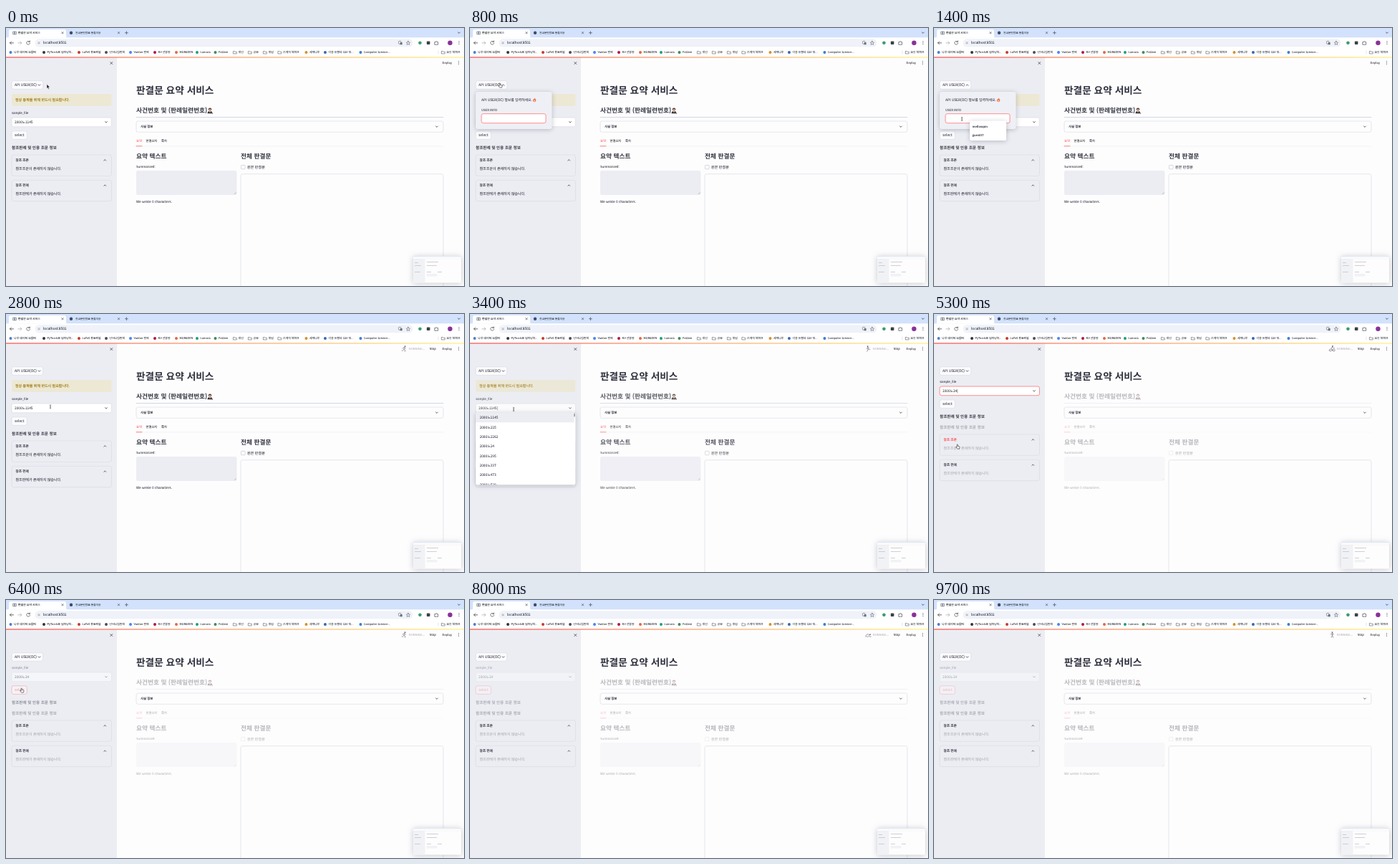
Recreate the animation shown at these times as an HTML page. Size 640 by 360 pixels, loop 9800 ms.

```html
<!DOCTYPE html>
<html lang="ko">
<head>
<meta charset="utf-8">
<title>판결문 요약 서비스</title>
<style>
  html, body { margin: 0; width: 100%; height: 100%; overflow: hidden; background: #fff; }
  svg { display: block; width: 100vw; height: 100vh; }
  text {
    font-family: "Noto Sans CJK KR", "Noto Sans CJK JP", "Noto Sans", sans-serif;
    white-space: pre; text-rendering: geometricPrecision;
  }
  .shadow { filter: drop-shadow(0 1px 3px rgba(40, 45, 70, .28)); }
  .soft { filter: drop-shadow(0 1px 4px rgba(40, 45, 60, .25)); }
</style>
</head>
<body>
<svg id="stage" viewBox="0 0 640 360"></svg>
<script>
const LOOP = 9800, STEP = 100;
const INK = '#31333f', RED = '#ff4b4b', PANEL = '#ecedf3', EDGE = '#d6d8df';

// Text is placed by its left edge and vertical middle; medium weight gets a hairline stroke.
const text = (x, y, size, str, fill = INK, weight = 400, id = '') =>
  `<text ${id && `id="${id}"`} x="${x}" y="${(y + size * .34).toFixed(2)}" font-size="${size}" font-weight="${weight}" fill="${fill}"` +
  ` stroke="${fill}" stroke-width="${weight === 500 ? .14 : weight === 400 ? .06 : 0}">${str}</text>`;
const box = (x, y, w, h, fill, stroke = 'none', r = 2.5, extra = '') =>
  `<rect x="${x}" y="${y}" width="${w}" height="${h}" rx="${r}" fill="${fill}" stroke="${stroke}" stroke-width=".6" ${extra}/>`;
const dot = (x, y, r, fill) => `<circle cx="${x}" cy="${y}" r="${r}" fill="${fill}"/>`;
const line = (d, stroke = INK, w = .7, extra = '') =>
  `<path d="${d}" fill="none" stroke="${stroke}" stroke-width="${w}" stroke-linecap="round" stroke-linejoin="round" ${extra}/>`;
const group = (id, body, extra = '') => `<g id="${id}" ${extra}>${body}</g>`;
const cross = (x, y, r, w) => line(`M${x - r} ${y - r}l${2 * r} ${2 * r}m0 ${-2 * r}l${-2 * r} ${2 * r}`, INK, w);
const chevron = (x, y, up = false, id = '') =>
  line(`M${x - 1.4} ${y + (up ? .7 : -.7)}l1.4 ${up ? -1.4 : 1.4}l1.4 ${up ? 1.4 : -1.4}`, INK, .8, id && `id="${id}"`);
const folder = (x, y) => line(`M${x - 2.2} ${y - 1.6}h1.6l.7.8h2.2v2.7h-4.5z`, '#555963', .6);

function browser() {
  const marks = [
    [6.5, '나루 데이터 모음터', '#4c7fd0'], [53, 'PyTorch로 딥러닝하...', '#333'],
    [102, 'LaTeX 튜토리얼', '#c9372c'], [140, '단어나침반북', '#4a4d55'],
    [174, 'Vanton 번역', '#4285f4'], [208, 'NV 선봉원', '#b5133f'],
    [238, 'MORADEN', '#e8663c'], [267, 'Lumora', '#16a081'], [292.5, 'Fotzeni', '#3c8c5a'],
    [320, '개인'], [341, '공부'], [362, '게임'], [382.5, '기계적 북마크'],
    [419.5, '새벽나루', '#d98f2b'], [446, '각종 유형의 CSV 파...', '#3567b5'],
    [495.5, 'Computer Science...', '#3b7dd8'], [611, '모든 북마크']
  ];
  return box(0, 0, 640, 13.5, '#d3e2fc', 'none', 0) +
    '<path d="M2 13.5q2 0 2-2V4.5q0-2.5 2.5-2.5h75q2.500 0 2.500 2.500v7q0 2 2 2z" fill="#fff"/>' +
    line('M10 5.200h2.200v3.400h-2.200zM12.200 5.200h2.200v3.400h-2.200z', '#4a5263', .6) +
    text(17, 6.7, 3.9, '판결문 요약 서비스', '#1f2329') + cross(79, 6.7, 1.2, .6) +
    dot(91, 6.7, 2.2, '#3e4a66') + text(97, 6.7, 3.75, '전국문헌정보 통합이용', '#333946') +
    cross(157.5, 6.7, 1.2, .6) + line('M166.400 6.700h4M168.400 4.700v4', INK, .6) + chevron(633, 6.7) +
    box(0, 13.5, 640, 27, '#fff', 'none', 0) +
    line('M10.500 20.800h-5m2-2l-2 2l2 2') + line('M16.800 20.800h5m-2-2l2 2l-2 2', '#a5a8af') +
    line('M33 19.200a2.400 2.400 0 1 0 .5 2M33.300 17.800v1.700h-1.700', '#444852') +
    box(40.5, 15.3, 528, 11, '#eff2f9', 'none', 5.5) + dot(46, 20.8, 2.9, '#fff') +
    line('M44.500 19.900h3m-3 1.900h3', '#444852', .5) + text(52, 20.8, 4.8, 'localhost:8501', '#24272d') +
    box(548.7, 18.4, 3.3, 3.8, '#fff', '#555963', .5) + box(550.7, 20, 3, 3.3, '#6b7078', 'none', .5) +
    line('M562 18.200l.8 1.800 1.900.2-1.400 1.300.4 1.900-1.700-1-1.700 1 .4-1.900-1.400-1.300 1.900-.2z', '#444852', .5) +
    dot(578.5, 20.8, 2.3, '#3a9a6c') + box(587.9, 18.5, 4.6, 4.6, '#3c4047', 'none', 1) +
    line('M599.300 19.500h1.400a.8.8 0 0 1 1.600 0h1.400v3.700h-4.400z', '#444852', .7) +
    dot(620.5, 20.8, 3.2, '#8a2f9a') +
    [18.9, 20.8, 22.7].map(y => dot(633, y, .55, '#444852')).join('') +
    marks.map(([x, name, color]) => (color ? dot(x, 34, 2, color) : folder(x, 34)) +
      text(x + 4.6, 34, 3.9, name, '#2c3038')).join('') +
    line('M604 32v4', '#c7cad2', .5);
}

function judge(x, y) {
  return dot(x, y - 1.7, 2.2, '#3a2a25') + dot(x, y - 1, 1.6, '#e5a98c') +
    `<path d="M${x - 3.500} ${y + 4}q0-3.300 3.500-3.300t3.500 3.300z" fill="#35313a"/>` +
    `<path d="M${x - .9} ${y + .8}h1.800l-.9 2.200z" fill="#fff"/>` +
    line(`M${x + 2} ${y + 3}l1.500 1.200`, '#8b5a35', 1);
}

function mainPage() {
  return text(182, 87.6, 13.7, '판결문 요약 서비스', INK, 700) +
    group('stale', text(182, 115.3, 8.7, '사건번호 및 (판례일련번호)', INK, 600) + judge(285, 115.3) +
      line('M182 124.500H611', '#c0c7dc', .7) +
      text(182, 157.7, 4.3, '요약', RED) + text(195.5, 157.7, 4.3, '판결요지') + text(217, 157.7, 4.3, '목차') +
      line('M182 164.900H611', '#e6e7ec', .5) + line('M182 164.800h8', RED, .7) +
      text(182, 179, 8.7, '요약 텍스트', INK, 600) + text(328, 179, 8.7, '전체 판결문', INK, 600) +
      text(182, 194, 4.3, 'Summarized:') + box(182, 199, 140.5, 34, PANEL) +
      line('M319.300 231.500l2-2m-.8 2l.8-.8', '#8d9099', .4) +
      text(182, 242.3, 4.7, 'We wrote 0 characters.') +
      box(328.6, 191.4, 5.4, 5.4, '#fff', '#b9bcc5', .7) + text(337, 194, 5.1, '원본 판결문')) +
    box(182, 130, 429, 15.3, 'none', EDGE) +
    text(188, 137.7, 4.4, '사실 정보', INK, 500) + chevron(602, 137.7) +
    box(328, 203.7, 283, 170, 'none', EDGE);
}

function expander(y, title, body, id) {
  return box(8, y, 139.5, 29.3, 'none', EDGE) + text(13.5, y + 7.4, 4.6, title, INK, 500, id) +
    chevron(138.300, y + 7.300, true) +
    text(13.5, y + 19.4, 5, body).replace('<text', '<text class="note"');
}

function sidebar() {
  const heading = '참조판례 및 인용 조문 정보';
  return box(0, 41, 155, 319, PANEL, 'none', 0) + cross(147.3, 49, 1.5, .7) +
    box(8, 73.7, 43.7, 11.6, '#fbfbfd', EDGE) + text(12, 79.5, 4.85, 'API USER(OC)') +
    chevron(46.5, 79.6, false, 'userDown') + chevron(46.5, 79.6, true, 'userUp') +
    group('warning', box(8, 92, 139.5, 16.7, '#ece8d3') + text(13, 100.2, 5, '정상 동작을 위해 반드시 필요합니다.', '#a17c17', 500)) +
    group('form', text(8, 119, 4.3, 'sample_file') +
      box(8, 125, 139.5, 12.7, '#fff', EDGE, 2.5, 'id="field"') + text(12, 131.3, 4.75, '', INK, 400, 'picked') +
      chevron(140, 131.4) +
      box(8, 143.8, 21.3, 11.6, '#fbfbfd', EDGE, 2.5, 'id="button"') + text(12, 149.6, 4.9, 'select', INK, 400, 'buttonText') +
      text(8, 167.2, 5.6, heading, INK, 600)) +
    group('oldHeading', text(8, 158.4, 5.6, heading, INK, 600), 'opacity=".36"') +
    group('notes', expander(177, '참조 조문', '참조조문이 존재하지 않습니다.', 'lawTitle') +
      expander(212.3, '참조 판례', '참조판례가 존재하지 않습니다.', 'caseTitle'));
}

function popover() {
  return box(8, 89, 106.5, 52, '#eff0f5', 'none', 3, 'class="shadow"') +
    text(16, 100.2, 4.85, 'API USER(OC) 정보를 입력하세요.') +
    '<path d="M90.200 97.800q2.500 1.500 2.200 3.500q-.4 1.900-2.400 1.900t-2.300-1.900q0-1.300 1.300-2.100q.9-.5 1.200-1.400z" fill="#ec7a55"/>' +
    dot(90, 101.7, .9, '#fbe3cf') +
    text(16, 114.2, 4.3, 'USER INFO') + box(16, 119.7, 90, 13, '#fff', RED) +
    text(20, 126.3, 4.75, '', INK, 400, 'userName') +
    group('hints', box(50, 129.5, 51, 27.5, '#fff', 'none', 2, 'class="shadow"') +
      box(50, 144.3, 51, 11, '#eceef2', 'none', 0, 'id="hintRow"') +
      text(53.5, 138, 4.1, 'mellowpin', INK, 600) + text(53.5, 150, 4.1, 'guest07', INK, 600));
}

function dropdown() {
  const cases = [1145, 225, 2262, 24, 295, 337, 473, 520];
  return box(8, 137.5, 139.5, 100.7, '#fff', 'none', 2.5, 'class="shadow"') +
    '<clipPath id="listClip"><rect x="8" y="137.500" width="139.500" height="100.700"/></clipPath>' +
    group('list', box(8, 178, 137.5, 13.3, PANEL, 'none', 0, 'id="row"') +
      cases.map((n, i) => text(13.5, 144.6 + i * 13.35, 4.8, '2000노' + n)).join(''), 'clip-path="url(#listClip)"') +
    box(145, 138.5, 2, 5, '#a9abb2', 'none', 1);
}

// Small athletes shown one after another while the app is busy.
const POSES = [
  [556.5, 45.2, 'M556.500 46.500v3m-2-2h4m-2 2l-1.300 2.800m1.300-2.800l1.300 2.800'],
  [557.6, 45.2, 'M557 46.500l-1 2.800l1.800 1l-.3 2M556 49.300l-1.500 1.800h-1.300M554 48l2.700-1.300l2 1.500'],
  [557, 45, 'M556.500 46.200l-1.700 2l1.800 1.200v1.800M556.500 46.500l1.800 1h1M552.300 50.500a1.500 1.500 0 1 0 3 0a1.500 1.500 0 1 0-3 0M557.300 50.500a1.500 1.500 0 1 0 3 0a1.500 1.500 0 1 0-3 0'],
  [559, 48.2, 'M553 49.500l3-2l2 1.800M552.500 51q1-.8 2 0t2 0t2 0t2 0'],
  [555.7, 45.2, 'M555.800 46.500l.3 2.800l-1.300 3M556.100 49.300l2.700.5M554 48.300l1.900-1.300l2 .8'],
  [556.5, 45.7, 'M556.500 47v2.500l-1.500 2.700m1.500-2.700l1.500 2.700M556.500 47.300l-2-2.800m2 2.800l2-2.800M552.800 44.300h7.400']
];

function header() {
  return group('busy', dot(0, 0, .9, '#5d606a').replace('<circle', '<circle id="head"') +
      line('', '#5d606a', .6, 'id="body"') +
      text(563, 48.4, 4.15, 'RUNNING...', '#b3b5bd') + text(591.7, 48.4, 4.3, 'Stop')) +
    text(609.5, 48.4, 4.2, 'Deploy') + [46.6, 48.4, 50.2].map(y => dot(632.6, y, .5, INK)).join('') +
    '<rect y="40.300" width="640" height="1.200" fill="url(#bar)"/>';
}

function thumbnail() {
  const bars = [[588, 326, 16], [588, 331, 14], [588, 340, 6], [603, 340, 6], [571, 327, 5], [571, 331, 9], [571, 340, 8]];
  return box(569, 318, 67, 37.5, '#fdfdfe', 'none', 1.5, 'class="soft"') +
    box(569, 318, 67, 1.5, '#e3ebfa', 'none', 0) + box(569, 322, 16.500, 33.5, '#f1f2f6', 'none', 0) +
    line('M569 322h67', '#f6d3b8', .2) +
    bars.map(([x, y, w]) => box(x, y, w, .8, '#c3c5cc', 'none', 0)).join('') +
    box(588, 343, 14.5, 3.5, '#f1f2f6', 'none', 0);
}

const CURSORS = {
  arrow: '<path d="M0-2.500v6l1.400-1.300 1 2.200 1-.5-1-2.100h1.900z" fill="#111" stroke="#fff" stroke-width=".5"/>',
  beam: line('M-.8-2.600q.8 0 .8.700v3.800q0 .7-.8.7M.8-2.600q-.8 0-.8.700v3.800q0 .7.8.7', '#333', .45),
  hand: '<path d="M-.9-2.800q.8-.7 1.200.2v2l2 .4q.8.300.7 1.300l-.6 2h-2.900l-2-2.400q0-.9 1.600.2z" fill="#fff" stroke="#222" stroke-width=".6"/>'
};

const stage = document.getElementById('stage');
stage.innerHTML =
  `<defs><linearGradient id="bar"><stop stop-color="${RED}"/><stop offset="1" stop-color="#fff27a"/></linearGradient></defs>` +
  box(0, 0, 640, 360, '#fdfdfe', 'none', 0) + mainPage() + sidebar() + browser() + header() +
  group('popover', popover()) + group('dropdown', dropdown()) + thumbnail() +
  group('cursor', Object.entries(CURSORS).map(([k, d]) => group(k, d)).join(''));

const $ = id => document.getElementById(id);
const show = (id, on) => $(id).setAttribute('display', on ? 'inline' : 'none');
const set = (id, name, value) => $(id).setAttribute(name, value);
const tint = (id, color) => ['fill', 'stroke'].forEach(name => set(id, name, color));
const ramp = (t, a, b) => Math.min(1, Math.max(0, (t - a) / (b - a)));
const smooth = p => p * p * (3 - 2 * p);
const fade = (t, a, b) => 1 - .66 * ramp(t, a, b) ** 1.4;
const notes = [...document.querySelectorAll('.note')];

// time, x, y
const PATH = [
  [0, 57, 81], [100, 57, 81], [500, 42, 80], [800, 42, 80], [1200, 39, 127], [1500, 39, 127],
  [1900, 62, 150], [2200, 62, 150], [2600, 62, 129], [3300, 62, 131], [3500, 60, 135],
  [4000, 34, 185], [5400, 33, 185], [6100, 22, 126], [6800, 22, 126], [7700, 646, 150], [9800, 646, 150]
];

function cursorAt(t) {
  const i = Math.max(1, PATH.findIndex(p => p[0] > t));
  const [a, b] = [PATH[i - 1], PATH[i]];
  const p = smooth(ramp(t, a[0], b[0]));
  return [a[1] + (b[1] - a[1]) * p, a[2] + (b[2] - a[2]) * p];
}

function cursorKind(t) {
  if (t < 300 || t >= 6900) return 'arrow';
  if (t >= 1100 && t < 1700 || t >= 2500 && t < 3500) return 'beam';
  return 'hand';
}

function draw(t) {
  const chosen = t >= 4500, moved = t >= 4800, focused = chosen && t < 5800, hot = t >= 6000;
  const open = t >= 600 && t < 2400;
  const old = fade(t, 3000, 4000);

  show('popover', open);
  set('popover', 'opacity', ramp(t, 500, 800));
  show('userUp', open);
  show('userDown', !open);
  show('hints', t >= 1200 && t < 2000);
  show('hintRow', t >= 1800);
  $('userName').textContent = t >= 2000 ? 'guest07' : '';

  show('busy', t >= 2300);
  const [hx, hy, d] = POSES[Math.max(0, Math.floor((t - 100) / 200)) % POSES.length];
  set('head', 'cx', hx);
  set('head', 'cy', hy);
  set('body', 'd', d);

  set('stale', 'opacity', old);
  set('warning', 'opacity', old);
  notes.forEach(n => n.setAttribute('opacity', old));

  show('dropdown', t >= 3400 && !chosen);
  const hover = Math.floor((cursorAt(t)[1] - 138) / 13.35);
  set('row', 'y', 138 + Math.max(0, hover) * 13.35);

  show('warning', !moved);
  show('oldHeading', moved);
  set('form', 'transform', `translate(0 ${moved ? -24 : 0})`);
  set('notes', 'transform', `translate(0 ${moved ? -9 : 0})`);
  set('form', 'opacity', chosen ? fade(t, 5500, 6600) : old);
  const caret = focused || t >= 3300 && !chosen;
  $('picked').textContent = (chosen ? '2000노24' : '2000노1145') + (caret ? '|' : '');
  set('field', 'stroke', focused ? RED : EDGE);
  set('button', 'stroke', hot ? RED : EDGE);
  tint('buttonText', hot ? RED : INK);
  tint('lawTitle', moved && t < 5700 ? RED : INK);

  const [x, y] = cursorAt(t), kind = cursorKind(t);
  set('cursor', 'transform', `translate(${x.toFixed(1)} ${y.toFixed(1)})`);
  Object.keys(CURSORS).forEach(k => show(k, k === kind));
}

const start = performance.now();
function tick() {
  const t = (performance.now() - start) % LOOP;
  draw(Math.floor(t / STEP) * STEP);
  requestAnimationFrame(tick);
}
tick();
</script>
</body>
</html>
```
